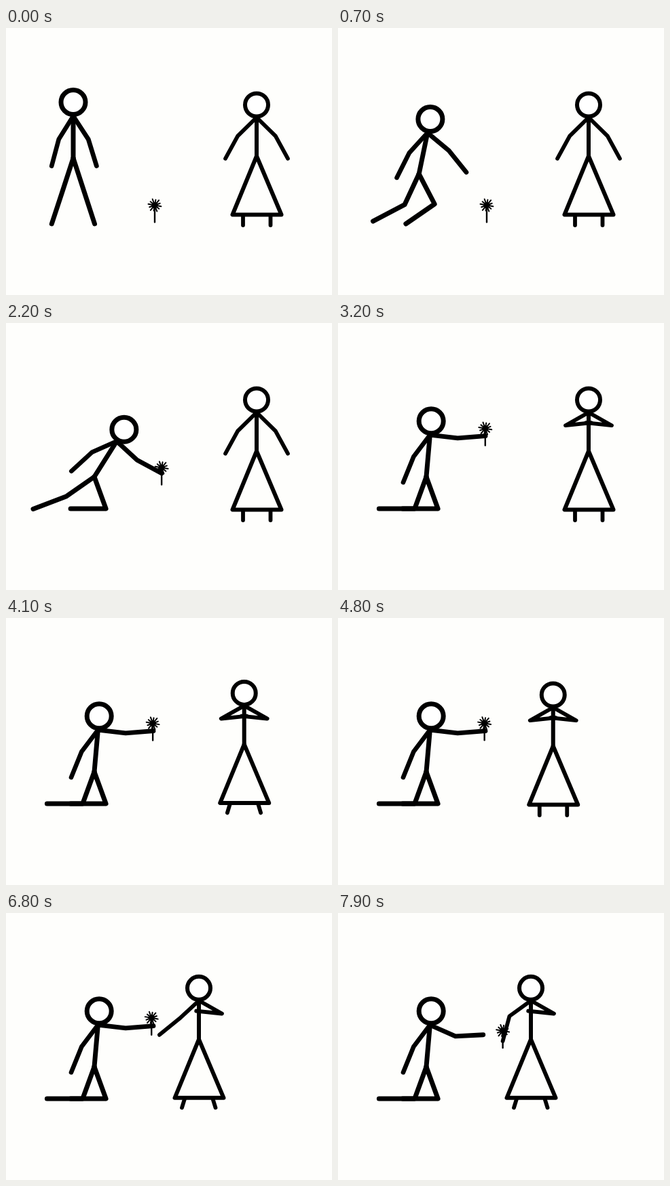
An HTML page with a canvas for the animation above (8000 ms loop, 480x394 px).

```html
<!DOCTYPE html>
<html lang="en">
<head>
<meta charset="utf-8">
<title>A flower for her</title>
<style>
  html, body { margin: 0; width: 100%; height: 100%; overflow: hidden; background: #fefefc; }
  canvas { display: block; }
</style>
</head>
<body>
<canvas id="stage" width="480" height="394"></canvas>
<script>
const ctx = document.getElementById('stage').getContext('2d');
const LOOP = 8000, STEP = 100;
const PICK = 1400, HANDOVER = 7100, END = 7900;
const FLOOR = 289;

// Man: hip position, torso lean, and [upper, lower] angles for each limb
const stand = { hip: [99, 192], lean: 0, backArm: [122, 105], frontArm: [57, 73],
                backLeg: [108, 108], frontLeg: [72, 72] };
const crouch = { hip: [125, 222], lean: 15, backArm: [135, 120], frontArm: [35, 45],
                 backLeg: [117, 165], frontLeg: [60, 165] };
const reach = { hip: [130, 227], lean: 55.3, backArm: [179, 163], frontArm: [65, 65],
                backLeg: [150, 156], frontLeg: [70, 180] };
const lift = { ...reach, lean: 36, backArm: [160, 141], frontArm: [48, 33] };
const offer = { ...lift, lean: 5, backArm: [127, 112], frontArm: [6.5, -4.4], backLeg: [110, 180] };
const release = { ...offer, frontArm: [24, -3] };

const manMoves = [[0, stand], [900, crouch], [PICK, reach], [2100, lift],
                  [2900, offer], [HANDOVER, offer], [END, release]];

// Woman: [upper, lower] arm angles as seen on the right; the left arm is mirrored
const rest = [44.5, 61.5], fold = [29.5, 186], lower = [70, 57], extend = [32, 32], take = [36, 75];
const foldMoves = [[2300, rest], [3200, fold]];
const takeMoves = [...foldMoves, [5400, fold], [6300, lower], [7000, extend], [HANDOVER, extend], [END, take]];

// Flower centre relative to the hand that holds it
const gripMoves = [[PICK, [5, -2]], [2100, [0, -8]], [2900, [0, -11]], [HANDOVER, [-3, -12]], [END, [0, -15]]];

const progress = (t, from, to) => Math.min(1, Math.max(0, (t - from) / (to - from)));

// Blends numbers, arrays and whole poses
function mix(a, b, k) {
  if (typeof a === 'number') return a + (b - a) * k;
  if (Array.isArray(a)) return a.map((v, i) => mix(v, b[i], k));
  return Object.fromEntries(Object.keys(a).map(name => [name, mix(a[name], b[name], k)]));
}

function at(moves, t) {
  const next = moves.findIndex(([time]) => time > t);
  if (next === 0) return moves[0][1];
  if (next < 0) return moves[moves.length - 1][1];
  const [from, a] = moves[next - 1], [to, b] = moves[next];
  return mix(a, b, progress(t, from, to));
}

function polar([x, y], angle, length) {
  const r = angle * Math.PI / 180;
  return [x + Math.cos(r) * length, y + Math.sin(r) * length];
}

function line(width, ...points) {
  ctx.lineWidth = width;
  ctx.beginPath();
  points.forEach(p => ctx.lineTo(...p));
  ctx.stroke();
}

function limb(width, start, [upper, lower], upperLength, lowerLength) {
  const joint = polar(start, upper, upperLength);
  const [x, y] = polar(joint, lower, lowerLength);
  const end = [x, Math.min(y, FLOOR)];
  line(width, start, joint, end);
  return end;
}

function disc([x, y], radius, fill) {
  ctx.fillStyle = fill;
  ctx.beginPath();
  ctx.arc(x, y, radius, 0, Math.PI * 2);
  ctx.fill();
}

function head(centre, radius, width) {
  disc(centre, radius, '#fff');
  ctx.lineWidth = width;
  ctx.stroke();
}

function drawMan(t) {
  const { hip, lean, backArm, frontArm, backLeg, frontLeg } = at(manMoves, t);
  const neck = polar(hip, lean - 90, 62);
  head(polar(neck, lean - 90, 20.5), 18, 7);
  line(7, hip, neck);
  limb(6.6, neck, backArm, 40, 41);
  limb(7, hip, backLeg, 50, 52.5);
  limb(7, hip, frontLeg, 50, 52);
  return limb(6.8, neck, frontArm, 41, 41);
}

function drawWoman(t) {
  const walk = progress(t, 3600, 5400);
  const x = mix(369, 284, walk ** 1.2);
  const stride = Math.abs(Math.sin(walk * Math.PI * 1.5));
  const p = (dx, y) => [x + dx, y - 2.7 * stride];
  const neck = p(0, 132), waist = p(0, 189);
  const mirrored = at(takeMoves, t).map(angle => 180 - angle);

  head(p(0, 113.5), 17, 6);
  line(6, neck, waist);
  line(6, waist, p(-35.5, 275.5), p(36.5, 275.5), waist);
  line(5.8, p(-20 - stride, 277), p(-20 - 5 * stride, 291 - stride));
  line(5.8, p(20.5, 277), p(20.5 + 4 * stride, 291 - stride));
  limb(5.8, neck, at(foldMoves, t), 39, 38);
  return limb(5.8, neck, mirrored, 39, 38);
}

function drawFlower(centre) {
  const petals = 12;
  line(2.4, centre, [centre[0], centre[1] + 25]);
  for (let i = 0; i < petals; i++) {
    line(2, centre, polar(centre, i * 360 / petals + 10, i % 2 ? 8.2 : 9.6));
  }
  disc(centre, 4.6, '#000');
}

function draw(t) {
  ctx.fillStyle = '#fefefc';
  ctx.fillRect(0, 0, 480, 394);
  ctx.strokeStyle = '#000';
  ctx.lineCap = ctx.lineJoin = 'round';
  const manHand = drawMan(t);
  const womanHand = drawWoman(t);
  const [x, y] = t < HANDOVER ? manHand : womanHand;
  const [dx, dy] = at(gripMoves, t);
  drawFlower(t <= PICK ? [219, 261.5] : [x + dx, y + dy]);
}

const start = performance.now();
function tick() {
  const t = (performance.now() - start) % LOOP;
  draw(Math.floor(t / STEP) * STEP);
  requestAnimationFrame(tick);
}
tick();
</script>
</body>
</html>
```
